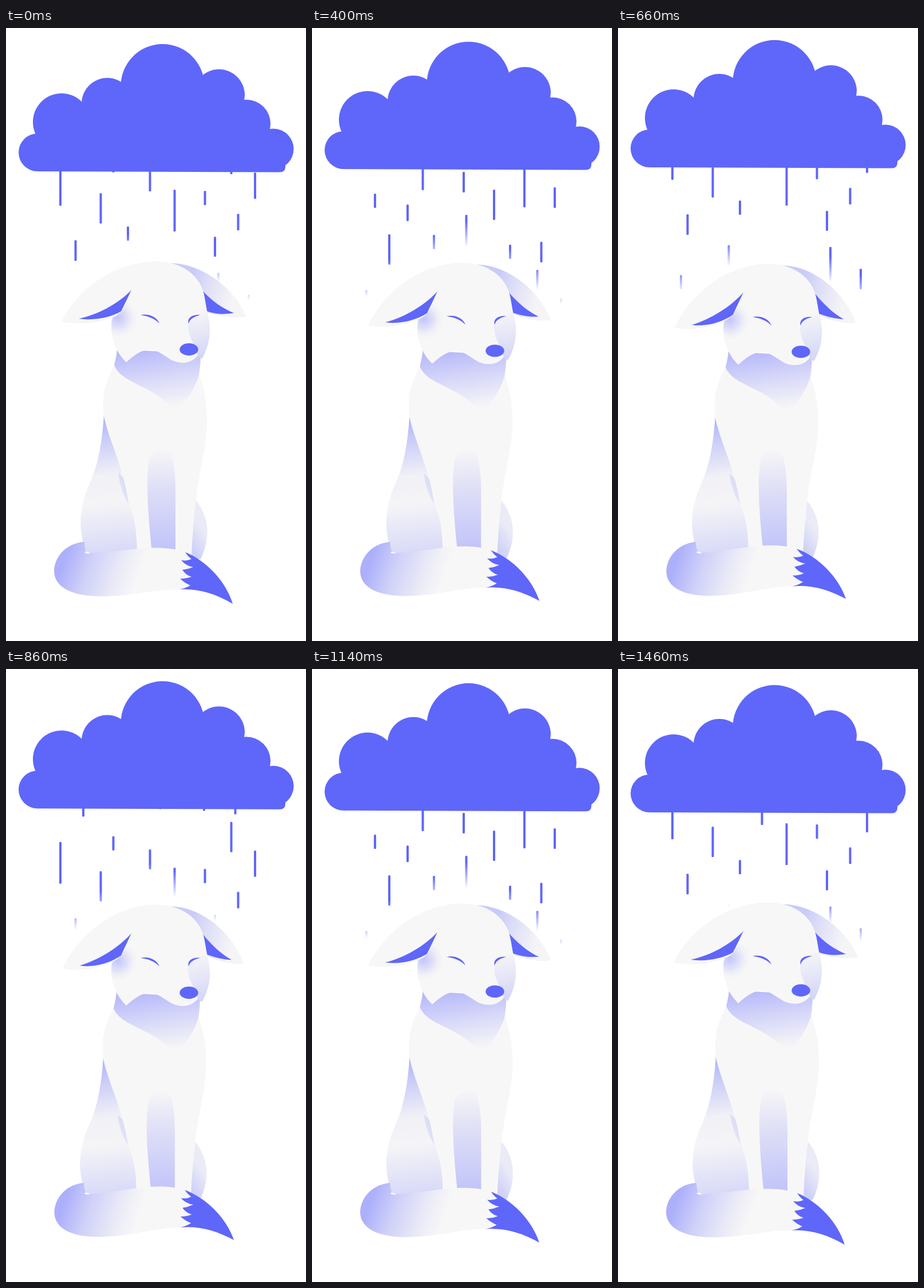
Recreate the animation shown at these times as an HTML page with a canvas. Size 524 by 1069 pixels, loop 1.48 s.

```html
<!DOCTYPE html>
<html lang="en">
<head>
<meta charset="utf-8">
<title>Fox in the rain</title>
<style>
  html, body { margin: 0; width: 100%; height: 100%; overflow: hidden; background: #fff; }
  canvas { display: block; width: 524px; height: 1069px; }
</style>
</head>
<body>
<canvas id="stage" width="524" height="1069"></canvas>
<script>
const ctx = document.getElementById('stage').getContext('2d');
const LOOP = 1480, TICK = 20, STEPS = 126;
const FALL = 6.46, RAIN_SPAN = FALL * STEPS / 2;
const BLUE = '#5f66fa', FUR = '#f7f7f7';

// x, bottom end at time zero, length
const DROPS = [
  [95, 310, 73], [110, 94, 25], [121.5, 406, 36], [135, 193, 53], [165.5, 341, 53],
  [167, 117, 29], [187.5, 252, 25], [193.5, 63, 46], [213, 371, 25], [213, 166, 25],
  [251.5, 285, 35], [265, 67, 36], [269.5, 180, 74], [294.5, 355, 73], [318, 115, 53],
  [346, 183, 25], [347.5, 309, 25], [365, 399, 35], [371, 93, 73], [393.5, 255, 53],
  [400.5, 189, 36], [405.5, 353, 29], [424, 94, 36], [435, 298, 46]
];

const PUFFS = [
  [55, 217, 33], [97, 164, 50], [177, 132, 45], [273.5, 101, 73],
  [372, 117, 45], [420, 167, 42], [467, 211, 35.5]
];

function fill(d, paint) {
  ctx.fillStyle = paint;
  ctx.fill(new Path2D(d));
}

function addStops(grad, stops) {
  for (const [at, color] of stops) grad.addColorStop(at, color);
  return grad;
}

const linear = (x0, y0, x1, y1, ...stops) =>
  addStops(ctx.createLinearGradient(x0, y0, x1, y1), stops);

const radial = (x, y, r, ...stops) =>
  addStops(ctx.createRadialGradient(x, y, 0, x, y, r), stops);

function group(draw) {
  ctx.save();
  draw();
  ctx.restore();
}

function drawRain(step) {
  const top = 225;
  for (const [x, start, len] of DROPS) {
    const raw = start + step * FALL - 160;
    const bottom = 160 + ((raw % RAIN_SPAN) + RAIN_SPAN) % RAIN_SPAN;
    // drops vanish along a slope just above the fox
    const end = 378 + (x < 262 ? 0.55 * (262 - x) : 0.6 * (x - 262));
    const y0 = Math.max(top, bottom - len), y1 = Math.min(bottom, end);
    if (y1 <= y0) continue;
    ctx.fillStyle = linear(0, end - 45, 0, end, [0, BLUE], [1, 'rgba(95,102,250,0)']);
    ctx.beginPath();
    ctx.roundRect(x - 2, y0, 4, y1 - y0, 1.5);
    ctx.fill();
  }
}

function drawCloud(lift) {
  ctx.translate(0, -lift);
  ctx.fillStyle = BLUE;
  for (const [x, y, r] of PUFFS) {
    ctx.beginPath();
    ctx.arc(x, y, r, 0, Math.PI * 2);
    ctx.fill();
  }
  fill(`M55 250 L55 217 L97 164 L177 132 L273 101 L372 117 L420 167 L467 211
        L488 236 L488 242 Q488 251.5 478 251.5 Z`, BLUE);
}

function drawBody(p) {
  ctx.translate(-1.2 * p, 915);
  ctx.scale(1, 1 - 0.012 * p);
  ctx.translate(0, -915);

  // hind legs
  fill('M331 823 C352 848 360 885 340 926 L322 926 C325 885 328 850 331 823 Z',
    linear(324, 905, 352, 885, [0, '#cfd1f8'], [1, '#ebebf7']));
  fill(`M171 675 C168 720 162 760 146 795 C126 838 126 882 142 916 L232 916
        C232 870 222 800 171 675 Z`,
    linear(170, 680, 195, 915, [0, '#b0b3fa'], [0.15, '#c9cbf8'], [0.42, '#f0f0f6'],
      [0.62, '#f5f5f7'], [1, '#d8d9f8']));
  fill('M196 775 C199 800 204 815 216 832 L214 795 Z',
    linear(198, 812, 214, 806, [0, 'rgba(214,215,247,0.3)'], [1, '#d8d9f7']));

  // torso and front legs
  fill(`M194 560 C193 572 191 580 189 588 C172 620 167 645 171 677
        C180 720 205 765 214 828 C226 858 229 880 229 925 L324 925
        C325 890 328 860 331 828 C335 785 351 725 351 690
        C351 655 347 630 337 603 L340 570 Z`, FUR);
  fill(`M256 925 C249 860 243 790 250 752 C254 732 282 728 289 745
        C294 760 296 780 296 810 L296 925 Z`,
    linear(268, 732, 276, 908, [0, FUR], [0.4, '#dfdff7'], [1, '#c2c4f9']));

  // chest ruff
  fill(`M194 560 C193 572 191 580 189 588 C203 622 255 620 297 669
        C320 645 331 625 337 605 C339 592 340 582 340 568 Z`,
    linear(258, 562, 272, 662, [0, '#b9bbfa'], [0.5, '#d9daf8'], [1, '#f6f6f7']));
}

function drawTail(p) {
  ctx.translate(140, 935);
  ctx.rotate(-0.034 * p);
  ctx.translate(-140, -935);
  fill(`M137 896 C101 899 84 926 84 948 C85 976 117 991 165 991
        C225 991 260 978 303 979 L330 975 L335 930 L313 914
        C290 906 262 905 229 908 C195 912 170 915 142 916 Q137 908 137 896 Z`,
    linear(110, 903, 234, 948, [0, '#acaffa'], [0.35, '#cfd1f8'], [0.75, '#ebebf7'], [1, FUR]));
  fill('M137 914 Q141 912 147 916 Q141 918 137 914 Z', '#fff');
  fill(`M313 914 C350 929 384 965 396 1004 C365 986 335 977 303 979
        Q314 977 322 972 Q312 968 304 960 Q314 961 324 957 Q314 954 308 945
        Q318 944 327 940 Q314 938 306 928 Q316 930 324 926 Q318 922 313 914 Z`, BLUE);
}

function drawHead(p) {
  ctx.translate(0, 4.3 * p);
  const droop = 6.7 * p, half = droop / 2;
  const lx = 2 * p, rx = -4 * p;

  // far ear
  fill(`M288 410 C345 411 ${402 + rx} ${457 + half} ${419 + rx} ${503 + droop}
        C${398 + rx} ${507 + droop} 372 ${502 + half} 350 496 L320 440 Z`,
    linear(322, 440, 398, 462, [0, '#c9cbf8'], [0.4, '#dedff7'], [1, '#f5f5f7']));
  fill(`M344 459 C360 ${476 + half / 2} ${378 + rx} ${489 + half} ${398 + rx} ${497 + droop}
        C380 ${500 + half} 365 499 351 494 Z`, BLUE);

  // face
  const face = `M263 407 C305 407 341 430 347 470 L351 493 C360 525 357 550 342 577
        L335 571 C325 584 308 587 291 580 C276 572 265 560 249 561
        C234 562 221 573 210 583 C195 568 184 547 184 520 C184 512 185 506 188 500
        L200 425 C220 412 243 407 263 407 Z`;
  fill(face, FUR);
  group(() => {
    ctx.clip(new Path2D(face));
    fill('M170 480 H250 V560 H170 Z',
      radial(195, 505, 38, [0, 'rgba(180,183,250,0.8)'], [0.45, 'rgba(195,197,249,0.45)'],
        [1, 'rgba(247,247,247,0)']));
    fill(`M350 494 C332 498 318 506 318 521 C319 540 330 552 335 571 L342 580 L365 560 L365 494 Z`,
      linear(334, 500, 350, 572, [0, '#f3f3f7'], [0.5, '#e4e5f7'], [1, '#d3d5f8']));
  });

  // near ear
  fill(`M263 407 C195 407 ${128 + lx} ${450 + half} ${97 + lx} ${512 + droop}
        C${130 + lx} ${519 + droop} 165 ${514 + half} 188 ${504 + half / 2}
        C203 498 212 482 219 457 Z`, FUR);
  fill(`M219 457 C196 ${481 + half / 2} ${160 + lx} ${500 + half} ${127 + lx} ${507 + droop}
        C${155 + lx} ${511 + droop} 185 ${504 + half} 201 ${494 + half / 2}
        C208 480 213 470 219 457 Z`, BLUE);

  // eyes and nose
  group(() => {
    ctx.translate(0, -0.8 * p);
    fill('M235 500.5 C250 497.5 264 504 268 515.5 C259 506 249 503 235 500.5 Z', BLUE);
    fill('M339 500.5 C325 499 316 506 319 515.5 C321 507.5 328 503.5 339 500.5 Z', BLUE);
  });
  ctx.fillStyle = BLUE;
  ctx.beginPath();
  ctx.ellipse(319.5, 560.5, 16.2, 10.7, 0, 0, Math.PI * 2);
  ctx.fill();
}

function render(now) {
  const t = Math.floor((now % LOOP) / TICK) * TICK;
  const step = Math.floor(t * STEPS / LOOP);
  const p = (1 - Math.cos(2 * Math.PI * step / STEPS)) / 2;

  ctx.fillStyle = '#fff';
  ctx.fillRect(0, 0, 524, 1069);
  group(() => drawRain(step));
  group(() => drawCloud(7.2 * p));
  group(() => drawBody(p));
  group(() => drawTail(p));
  group(() => drawHead(p));
}

const began = performance.now();
function loop() {
  render(performance.now() - began);
  requestAnimationFrame(loop);
}
loop();
</script>
</body>
</html>
```
